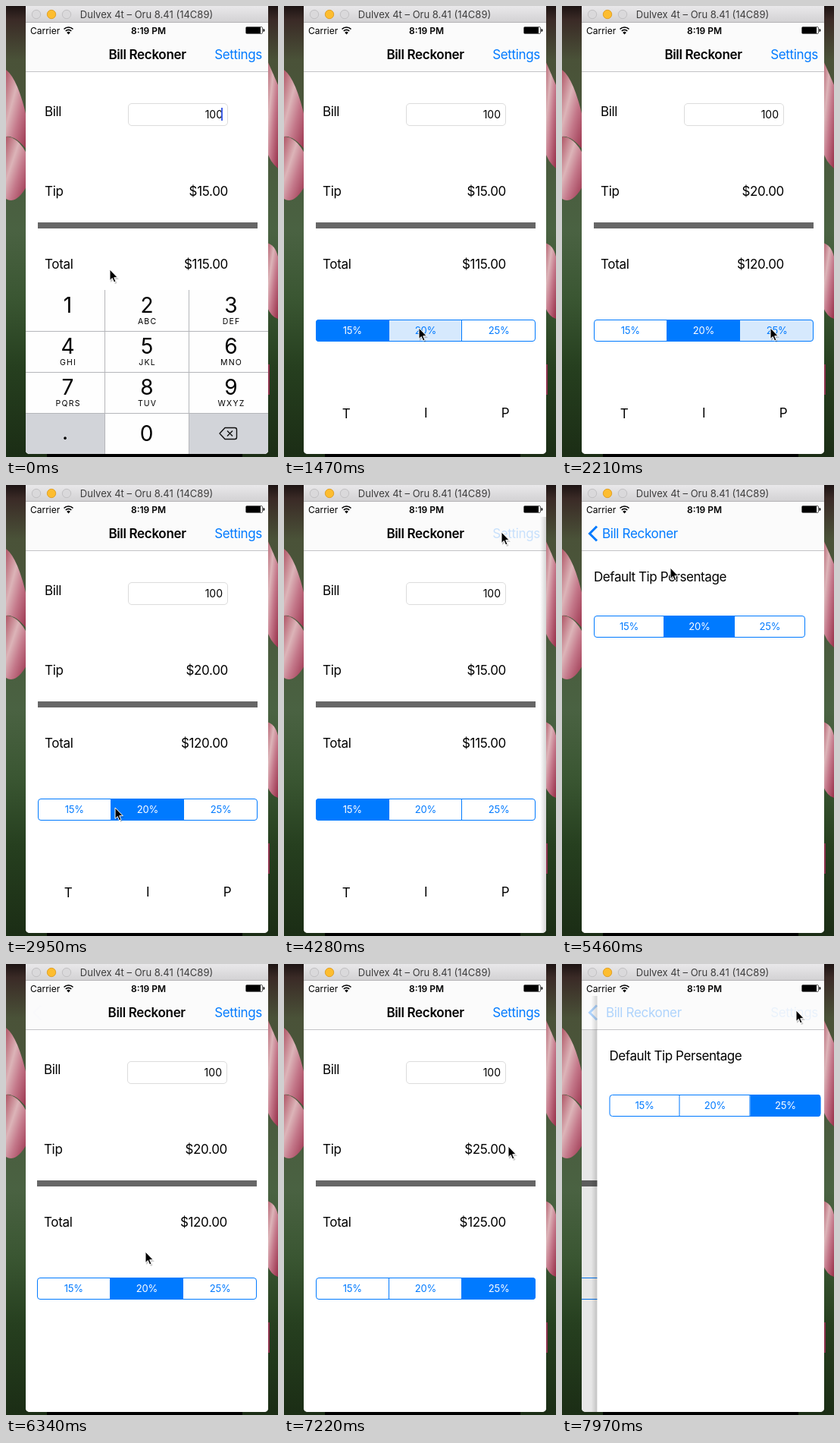
Animation of 359 by 594 pixels, one loop 8000 ms. Source, as an HTML page:

```html
<!DOCTYPE html>
<html lang="en">
<head>
<meta charset="utf-8">
<style>
  html, body { margin: 0; width: 100%; height: 100%; overflow: hidden; background: #22351b; }
  svg { display: block; width: 359px; height: 594px; font: 400 17px Inter, Roboto, sans-serif; letter-spacing: -.33px; }
  .mid { text-anchor: middle; }
  .end { text-anchor: end; }
  .blue { fill: #007aff; }
  .seg { font-size: 13px; letter-spacing: -.2px; }
  .digit { font-size: 28px; letter-spacing: 0; text-anchor: middle; }
  .abc { font-size: 10.5px; letter-spacing: 1.2px; text-anchor: middle; }
  .plain { letter-spacing: 0; }
</style>
</head>
<body>
<svg viewBox="0 0 359 594">
  <defs>
    <clipPath id="screen"><path d="M26 0H346V585a5 5 0 0 1-5 5H31a5 5 0 0 1-5-5Z"/></clipPath>
    <linearGradient id="leaf" x2="0" y2="1">
      <stop stop-color="#1d1413"/><stop offset=".03" stop-color="#3a2a26"/>
      <stop offset=".12" stop-color="#4a5238"/><stop offset=".5" stop-color="#4a6242"/>
      <stop offset=".65" stop-color="#3a5632"/><stop offset=".8" stop-color="#263f1f"/>
      <stop offset="1" stop-color="#1b2d15"/>
    </linearGradient>
    <linearGradient id="petal" x2="1" y2="1">
      <stop stop-color="#b05767"/><stop offset=".35" stop-color="#dcb4b8"/>
      <stop offset=".6" stop-color="#c4788a"/><stop offset="1" stop-color="#982f49"/>
    </linearGradient>
    <linearGradient id="bar" x2="0" y2="1">
      <stop stop-color="#e9e8ea"/><stop offset="1" stop-color="#d2d1d3"/>
    </linearGradient>
    <linearGradient id="edge">
      <stop stop-color="#000" stop-opacity="0"/><stop offset="1" stop-color="#000" stop-opacity=".16"/>
    </linearGradient>
  </defs>

  <g id="wall">
    <path fill="url(#leaf)" d="M0 0H359V594H0Z"/>
    <path fill="url(#petal)" d="M0 84Q16 96 28 150V190Q12 170 0 172Z"/>
    <path fill="url(#petal)" d="M0 172Q16 172 28 196V236Q14 262 0 254Z"/>
    <path fill="url(#petal)" d="M344 70Q353 90 359 104V214Q348 205 344 190Z"/>
    <path fill="url(#petal)" d="M344 312Q355 314 359 330V412Q350 410 344 395Z"/>
    <path fill="#8a3049" d="M344 472h4v40h-4Z"/>
    <path d="M54 589H312V594H54Z"/>
  </g>

  <g clip-path="url(#screen)">
    <path fill="#fff" d="M26 0H346V590H26Z"/>
    <g id="main">
      <path fill="#fff" d="M26 87H346V590H26Z"/>
      <text x="51" y="145">Bill</text>
      <rect x="161.5" y="128.5" width="131" height="29" rx="4.5" fill="#fff" stroke="#dcdcdc"/>
      <text class="end plain" x="286" y="148" font-size="14">100</text>
      <path id="caret" fill="#4263e8" d="M284 134h2v17h-2Z"/>
      <text x="51" y="250">Tip</text>
      <text class="end" id="tip" x="293" y="250"></text>
      <path fill="#666" d="M42 285H332V293H42Z"/>
      <text x="51" y="346">Total</text>
      <text class="end" id="total" x="293" y="346"></text>
      <g id="rate" class="seg"></g>
      <g id="letters" class="mid">
        <text x="82" y="543">T</text><text x="187" y="542">I</text><text x="292" y="542">P</text>
      </g>
    </g>
    <path id="dim" d="M26 87H346V590H26Z"/>
    <g id="keys"></g>

    <g id="nav">
      <path fill="#fbfbfb" d="M26 22H346V86H26Z"/>
      <path fill="#c4c4c6" d="M26 86H346V87H26Z"/>
      <text id="title" class="mid" x="186.5" y="70" font-weight="600">Bill Reckoner</text>
      <text id="open" class="blue end" x="338" y="70">Settings</text>
      <g id="back" class="blue">
        <path fill="none" stroke="#007aff" stroke-width="3" d="M46 54.5L36.500 64L46 73.5"/>
        <text id="backText" x="53" y="70">Bill Reckoner</text>
      </g>
    </g>

    <g id="page">
      <path id="shadow" fill="url(#edge)" d="M18 42H26V590H18Z"/>
      <path fill="#fff" d="M26 87H346V590H26Z"/>
      <text x="42" y="127" style="letter-spacing:-.43px">Default Tip Persentage</text>
      <g id="preset" class="seg"></g>
    </g>

    <g id="status" class="plain" font-size="12">
      <text x="32" y="37">Carrier</text>
      <path fill="none" stroke="#000" stroke-width="1.7"
        d="M76.5 30.5a8.5 8.5 0 0 1 12 0M78.8 33a5.2 5.2 0 0 1 7.4 0"/>
      <path d="M82.5 37.5l-2.3-2.6a3.2 3.2 0 0 1 4.6 0Z"/>
      <text class="mid" x="188" y="37" font-weight="600">8:19 PM</text>
      <rect x="316.5" y="27.5" width="22" height="9" rx="1.5" fill="none" stroke="#000" stroke-opacity=".6"/>
      <path d="M317 28H336V36H317ZM339.5 30a2 2 0 0 1 0 4Z"/>
    </g>

    <path fill="url(#bar)" d="M26 0H346V22H26Z"/>
    <path fill="#b4b3b5" d="M26 21H346V22H26Z"/>
    <g stroke="#c2c1c3" fill="#dad9db">
      <circle cx="40" cy="11" r="5.7"/><circle cx="80" cy="11" r="5.7"/>
      <circle cx="60" cy="11" r="5.7" fill="#fdbd2f" stroke="#e0a12a"/>
    </g>
    <text class="mid plain" x="185.5" y="16" font-size="13" fill="#3c3c3c">Dulvex 4t – Oru 8.41 (14C89)</text>
  </g>

  <g id="cursor">
    <path d="M1 2V17L4.5 14L7 19L9.5 18L7.5 13H12Z" opacity=".2"/>
    <path stroke="#fff" stroke-linejoin="round" d="M0 0V14.5L3.3 11.5L5.6 17L8 16L5.7 10.7H10.3Z"/>
  </g>
</svg>

<script>
const $ = id => document.getElementById(id);
const clamp = v => Math.min(1, Math.max(0, v));
const LOOP = 8000, TICK = 147.55;
const RATES = [15, 20, 25];

// Each row: tick, value; the value holds until the next row.
const CHOICE = [[0, 0], [11, 1], [16, 2], [19, 1], [25, 0], [35, 1], [48, 2]];
const PRESS = { 10: 1, 15: 2, 18: 1, 24: 0, 34: 1, 47: 2 };
// Pointer path: tick, x, y
const POINTER = [
  [0, 137, 347], [3, 137, 347], [8, 172, 414], [10, 178, 424], [11, 178, 424],
  [13, 214, 425], [15, 275, 424], [16, 275, 424], [17, 260, 424], [18, 190, 425],
  [19, 180, 425], [20, 144, 425], [22, 108, 424], [24, 95, 424], [25, 120, 400],
  [26, 287, 62], [30, 287, 62], [32, 240, 120], [34, 180, 182], [35, 180, 182],
  [36, 172, 165], [37, 143, 109], [39, 62, 64], [40, 62, 64], [41, 85, 130],
  [42, 145, 290], [43, 184, 379], [44, 215, 398], [46, 278, 420], [48, 280, 420],
  [49, 296, 240], [50, 309, 61], [54, 309, 61]
];

function segment(id, x, y, w) {
  const cell = w / 3, clip = id + 'Clip';
  let cells = '', labels = '';
  RATES.forEach((rate, i) => {
    cells += `<rect x="${Math.round(x + i * cell)}" y="${y}" width="${Math.ceil(cell)}" height="29"/>`;
    labels += `<text class="mid" x="${x + (i + .5) * cell}" y="${y + 19}">${rate}%</text>`;
  });
  const lines = [1, 2].map(i => `M${Math.round(x + i * cell) - .5} ${y}v29`).join('');
  $(id).innerHTML =
    `<clipPath id="${clip}"><rect x="${x}" y="${y}" width="${w}" height="29" rx="4"/></clipPath>
     <g class="cells" clip-path="url(#${clip})">${cells}</g>
     <path d="${lines}" stroke="#007aff"/>
     <rect x="${x + .5}" y="${y + .5}" width="${w - 1}" height="28" rx="3.5" fill="none" stroke="#007aff"/>${labels}`;
  const bodies = $(id).querySelectorAll('.cells rect'), texts = $(id).querySelectorAll('text');
  return (chosen, pressed) => RATES.forEach((_, i) => {
    bodies[i].setAttribute('fill', i === chosen ? '#007aff' : i === pressed ? '#d6e9fd' : '#fff');
    texts[i].setAttribute('fill', i === chosen ? '#fff' : '#007aff');
  });
}

function buildKeys() {
  const abc = ['', 'ABC', 'DEF', 'GHI', 'JKL', 'MNO', 'PQRS', 'TUV', 'WXYZ'];
  const cols = [81.5, 186, 297];
  let out = `<path fill="#fefefe" d="M26 374H346V590H26Z"/>
    <path fill="#d2d4d9" d="M26 537H130V590H26ZM242 537H346V590H242Z"/>
    <path stroke="#b5b6ba" d="M26 428.5H346M26 482.5H346M26 536.5H346M130.5 374V590M241.5 374V590"/>`;
  abc.forEach((s, i) => {
    const x = cols[i % 3], y = 404 + 54 * Math.floor(i / 3);
    out += `<text class="digit" x="${x}" y="${y}">${i + 1}</text><text class="abc" x="${x + .6}" y="${y + 15}">${s}</text>`;
  });
  out += `<text class="digit" x="78" y="571">.</text><text class="digit" x="185.5" y="573">0</text>
    <path d="M282 563L289 555.5H302a2.5 2.5 0 0 1 2.5 2.5V568a2.5 2.5 0 0 1-2.5 2.5H289ZM292 559.5l7 7m0-7l-7 7"
      fill="none" stroke="#111" stroke-width="1.4" stroke-linejoin="round"/>`;
  $('keys').innerHTML = out;
}

function hold(rows, n) {
  return rows.filter(r => r[0] <= n).pop()[1];
}

function along(rows, n) {
  const i = rows.findIndex(r => r[0] >= n), b = rows[i], a = rows[Math.max(0, i - 1)];
  const f = b === a ? 0 : (n - a[0]) / (b[0] - a[0]);
  return [a[1] + (b[1] - a[1]) * f, a[2] + (b[2] - a[2]) * f];
}

const move = (id, x, y = 0) => $(id).setAttribute('transform', `translate(${x} ${y})`);
const fade = (id, v) => $(id).setAttribute('opacity', v);

const paintRate = segment('rate', 42, 413, 290);
const paintPreset = segment('preset', 42, 172, 279);
buildKeys();

function draw(n) {
  const choice = hold(CHOICE, n), tip = RATES[choice];
  paintRate(choice, PRESS[n]);
  paintPreset(choice, PRESS[n]);
  $('tip').textContent = `$${tip}.00`;
  $('total').textContent = `$${100 + tip}.00`;
  fade('caret', n === 0 ? 1 : 0);
  fade('letters', n < 37 ? 1 : 0);
  move('keys', 0, 216 * clamp(n / 3) ** 1.3);

  // "shown" is how far the settings page has come in, 0 to 1.
  const popping = n >= 40 && n < 52;
  const start = n < 40 ? 29 : popping ? 40.4 : 52;
  const u = clamp((n - start) * .3), eased = 1 - (1 - u) ** 3;
  const shown = popping ? 1 - eased : eased;
  const pushing = !popping && n >= start && shown < 1;
  move('main', -96 * shown);
  fade('dim', .1 * shown);
  move('page', 320 * (1 - shown));
  fade('page', shown > 0 || pushing ? 1 : 0);
  fade('shadow', popping ? shown : 1);

  move('title', -78 * shown);
  fade('title', clamp(1 - 2 * shown));
  move('backText', 78 * (1 - shown));
  fade('back', !popping ? clamp(2.5 * u - 1.2) : .4 * shown);
  fade('open', pushing ? .2 * (1 - shown) ** .4 : clamp(1 - 2 * shown));

  move('cursor', ...along(POINTER, n));
}

let last = -1;
function tick() {
  const n = Math.min(54, Math.floor((performance.now() % LOOP + 12) / TICK));
  if (n !== last) draw(last = n);
  requestAnimationFrame(tick);
}
tick();
</script>
</body>
</html>
```
